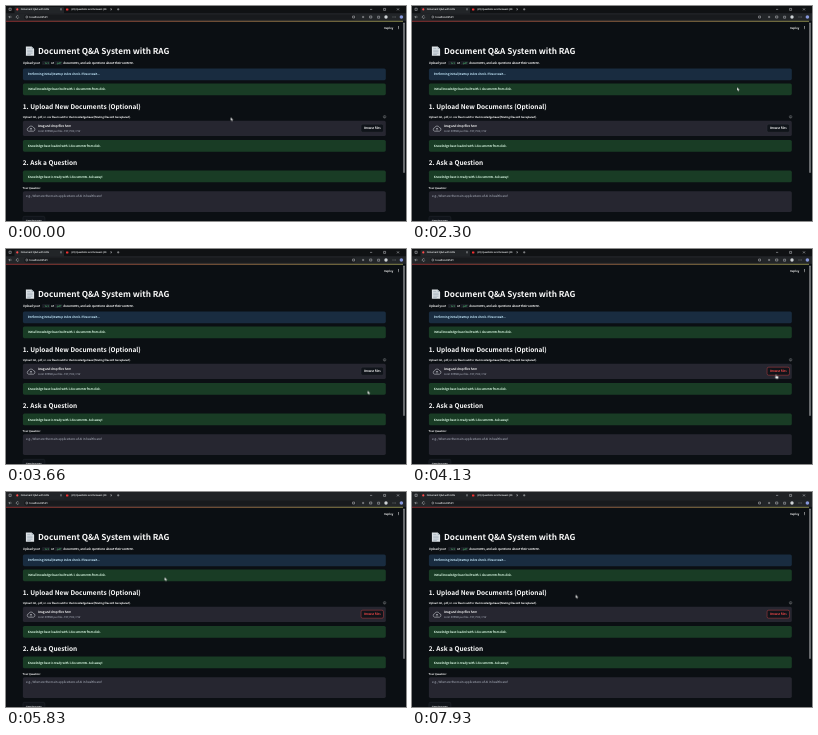
Animation of 400x215 px, one loop 8000 ms. Source, as an HTML page:

```html
<!DOCTYPE html>
<html lang="en">
<head>
<meta charset="utf-8">
<title>Document Q&amp;A with RAG</title>
<style>
  html, body { margin: 0; width: 100%; height: 100%; overflow: hidden; background: #0b0f13; }
  svg { display: block; width: 100vw; height: 100vh; }
  text {
    font-family: "Noto Sans CJK JP", "Noto Sans CJK SC", "Noto Sans CJK", "Open Sans", sans-serif;
    font-size: 2.98px; color: #fafafa; fill: currentColor; stroke: currentColor; stroke-width: .09;
    text-rendering: geometricPrecision;
  }
  .h1 { font-size: 8.2px; font-weight: 700; stroke: none; }
  .h2 { font-size: 6.49px; font-weight: 600; stroke: none; }
  .small { font-size: 2.61px; }
  .dim { color: #a3a8b4; stroke-width: .04; }
  .ui { font-family: "Open Sans", sans-serif; font-size: 2.4px; color: #d4d6d8; }
  .code { font-family: "Noto Sans Mono", monospace; font-size: 2.5px; color: #5ce488; stroke: none; }
  .note { color: #c7ebff; }
  .ok { color: #dffde9; }
  .icon { fill: none; stroke: #c4c7ca; stroke-width: .5; }
  .field { fill: #262630; }
  .info { fill: #192c40; }
  .good { fill: #193c25; }

  #strip { animation: blur 8s step-end infinite; }
  @keyframes blur { 0% { fill: #101214 } 67.5%, 100% { fill: #202225 } }

  #browse rect { fill: #10141a; animation: edge 8s step-end infinite; }
  #browse text { animation: ink 8s step-end infinite; }
  @keyframes edge {
    0% { stroke: #41444c; stroke-width: .25 }
    50.8%, 100% { stroke: #ff4b4b; stroke-width: .35 }
  }
  @keyframes ink { 0% { color: #fafafa } 50.8%, 100% { color: #ff4b4b } }

  #cursor { animation: move 8s linear infinite; }
  @keyframes move {
    0%, 18.75% { transform: translate(224.6px, 111.2px); animation-timing-function: ease-in-out }
    22%, 28.75% { transform: translate(325px, 81.2px); animation-timing-function: ease-in-out }
    38.75%, 40% { transform: translate(363.6px, 130.2px); animation-timing-function: ease-in-out }
    44% { transform: translate(361px, 144.5px); animation-timing-function: ease-in-out }
    49.5%, 50.35% { transform: translate(363.5px, 131px) }
    51.6%, 64.5% { transform: translate(363.3px, 125.2px) }
    65.37% { transform: translate(349.2px, 125.2px); animation-timing-function: cubic-bezier(.3, .2, .6, 1) }
    74.5%, 77.5% { transform: translate(148.3px, 83px); animation-timing-function: ease-in-out }
    80.37%, 83.7% { transform: translate(74px, 67.3px) }
    83.75%, 84.1% { transform: translate(72px, 45.5px) }
    84.13%, 87% { transform: translate(92.3px, 31.3px); animation-timing-function: ease-in-out }
    97%, 100% { transform: translate(163.6px, 102.6px) }
  }
  #arrow { animation: arrow 8s step-end infinite; }
  #hand { animation: hand 8s step-end infinite; }
  @keyframes arrow { 0% { opacity: 1 } 50.8% { opacity: 0 } 65%, 100% { opacity: 1 } }
  @keyframes hand { 0% { opacity: 0 } 50.8% { opacity: 1 } 65%, 100% { opacity: 0 } }
</style>
</head>
<body>
<svg viewBox="0 0 400 215" preserveAspectRatio="none">
  <defs>
    <linearGradient id="glow"><stop stop-color="#ff4b4b"/><stop offset="1" stop-color="#fffd80"/></linearGradient>
  </defs>
  <rect width="400" height="215" fill="#0b0f13"/>

  <!-- Browser bar -->
  <rect id="strip" width="400" height="7.5" fill="#101214"/>
  <rect y="7.2" width="400" height="7.7" fill="#222528"/>
  <path d="M8.5 7.5V2q0-1 1-1H57q1 0 1 1V7.5z" fill="#222528"/>
  <path class="icon" d="M3 2.2h2.2v2.2H3z"/>
  <circle cx="11.3" cy="3.4" r="1.1" fill="#ff4b4b"/>
  <text class="ui" x="14.8" y="4.2">Document Q&amp;A with RAG</text>
  <path class="icon" d="M54.2 2.5l1.6 1.6m0-1.6l-1.6 1.6M104.4 2.5l1.6 1.6m0-1.6l-1.6 1.6M111 3.3h2.4m-1.2-1.2v2.4"/>
  <rect x="60" y="2.4" width="2.4" height="2" rx=".4" fill="#f03030"/>
  <text class="ui" x="65.4" y="4.2">(20) Questions and Answers (20</text>
  <path class="icon" d="M364 3.4h2.2M377.6 2.4h2v2h-2zM391 2.4l2 2m0-2l-2 2"/>
  <rect x="18" y="8.4" width="332" height="5.4" rx="2.7" fill="#181a1d"/>
  <path class="icon" d="M5.6 11H2.8m1.2-1.2L2.8 11 4 12.2M12.6 10.2a1.3 1.3 0 1 0 .2 1.2"/>
  <circle class="icon" cx="20.8" cy="11" r="1"/>
  <text class="ui" x="23.6" y="11.9" style="font-size:2.7px">localhost:8501</text>
  <path class="icon" d="M346.6 10h2v2h-2zM356 11h2.2m-1.1-1.1v2.2M363.6 10h2.2v2h-2.2zM371.6 12.2v-2h2v2z"/>
  <circle cx="380" cy="11" r="1.7" fill="#cfd3d6"/>
  <path d="M386.6 11h3" stroke="#c5c8ca" stroke-width=".55" stroke-dasharray=".6"/>
  <circle cx="395.4" cy="11" r="1.8" fill="#8798dc"/>

  <rect y="14.9" width="397" height=".5" fill="url(#glow)"/>
  <rect x="397.3" y="16.5" width="1.4" height="150.5" rx=".7" fill="#8f9194"/>
  <text x="378.2" y="22.6" style="font-size:2.75px">Deploy</text>
  <path d="M392.5 20.2v2.9" stroke="#fafafa" stroke-width=".75" stroke-dasharray=".65 .48"/>

  <!-- Heading -->
  <path d="M19.9 40.5h5.7l2.5 2.5v6.8h-8.2z" fill="#dde2e6"/>
  <path d="M25.6 40.5V43h2.5z" fill="#a3b0b8"/>
  <path d="M21.2 42.4h3.2M21.2 44.2h5.4M21.2 45.7h5.4M21.2 47.2h5.4M21.2 48.6h3.6" stroke="#8193a0" stroke-width=".5"/>
  <text class="h1" x="32" y="48.2">Document Q&amp;A System with RAG</text>
  <text x="16.8" y="58">Upload your</text>
  <rect x="36" y="55" width="8" height="4" rx=".8" fill="#1a1c24"/>
  <text class="code" x="37" y="57.9">.txt</text>
  <text x="44.9" y="58">or</text>
  <rect x="48.5" y="55" width="8" height="4" rx=".8" fill="#1a1c24"/>
  <text class="code" x="49.5" y="57.9">.pdf</text>
  <text x="57.2" y="58">documents, and ask questions about their content.</text>

  <rect class="info" x="16.9" y="62.5" width="362.9" height="11.7" rx="1.6"/>
  <text class="note" x="21.8" y="69.4">Performing initial/startup index check. Please wait...</text>
  <rect class="good" x="16.9" y="77.5" width="362.9" height="11.7" rx="1.6"/>
  <text class="ok" x="21.8" y="84.4">Initial knowledge base built with 1 documents from disk.</text>

  <!-- Upload -->
  <text class="h2" x="16.8" y="102.9">1. Upload New Documents (Optional)</text>
  <text class="small" x="16.8" y="111.7">Upload .txt, .pdf, or .csv files to add to the knowledge base (Existing files will be replaced).</text>
  <circle class="icon" cx="378.6" cy="110.8" r="1.3" style="stroke-width:.3"/>
  <text x="378.6" y="111.5" text-anchor="middle" style="font-size:1.9px">?</text>
  <rect class="field" x="16.9" y="114.8" width="362.9" height="15.2" rx="1.6"/>
  <path d="M22.6 125.2a1.8 1.8 0 0 1 .1-3.5 2.5 2.5 0 0 1 4.6-.3 1.95 1.95 0 0 1 .2 3.8zM25 124.5v-2.4m-1 1l1-1 1 1" fill="none" stroke="#c2c5cc" stroke-width=".6"/>
  <text x="32" y="121.2">Drag and drop files here</text>
  <text class="small dim" x="32" y="126">Limit 200MB per file • TXT, PDF, CSV</text>
  <g id="browse">
    <rect x="355.1" y="118.2" width="22.4" height="8" rx="1.6"/>
    <text x="366.3" y="123.2" text-anchor="middle">Browse files</text>
  </g>
  <rect class="good" x="16.9" y="134" width="362.9" height="11.7" rx="1.6"/>
  <text class="ok" x="21.8" y="140.9">Knowledge base loaded with 1 documents from disk.</text>

  <!-- Question -->
  <text class="h2" x="16.8" y="159.2">2. Ask a Question</text>
  <rect class="good" x="16.9" y="164.6" width="362.9" height="11.7" rx="1.6"/>
  <text class="ok" x="21.8" y="171.5">Knowledge base is ready with 1 documents. Ask away!</text>
  <text class="small" x="16.8" y="182.8">Your Question:</text>
  <rect class="field" x="16.9" y="185.2" width="362.9" height="20.7" rx="1.6"/>
  <text class="dim" x="20" y="191">e.g., What are the main applications of AI in healthcare?</text>
  <rect x="16.9" y="210.3" width="22" height="8" rx="1.6" fill="#10141a" stroke="#41444c" stroke-width=".25"/>
  <text x="19.8" y="215.6">Get Answer</text>

  <!-- Pointer -->
  <g id="cursor">
    <path id="arrow" d="M0 0v3.6l.85-.75.55 1.3.6-.25-.55-1.25h1.15z" fill="#fff" stroke="#111" stroke-width=".15"/>
    <path id="hand" d="M.5.4q.4-.5.8 0v1.5l1.5.4q.5.2.4.8l-.4 1.5H.9L-.4 3q0-.6.5-.5l.4.3z" fill="#fff" stroke="#111" stroke-width=".15"/>
  </g>
</svg>
</body>
</html>
```
